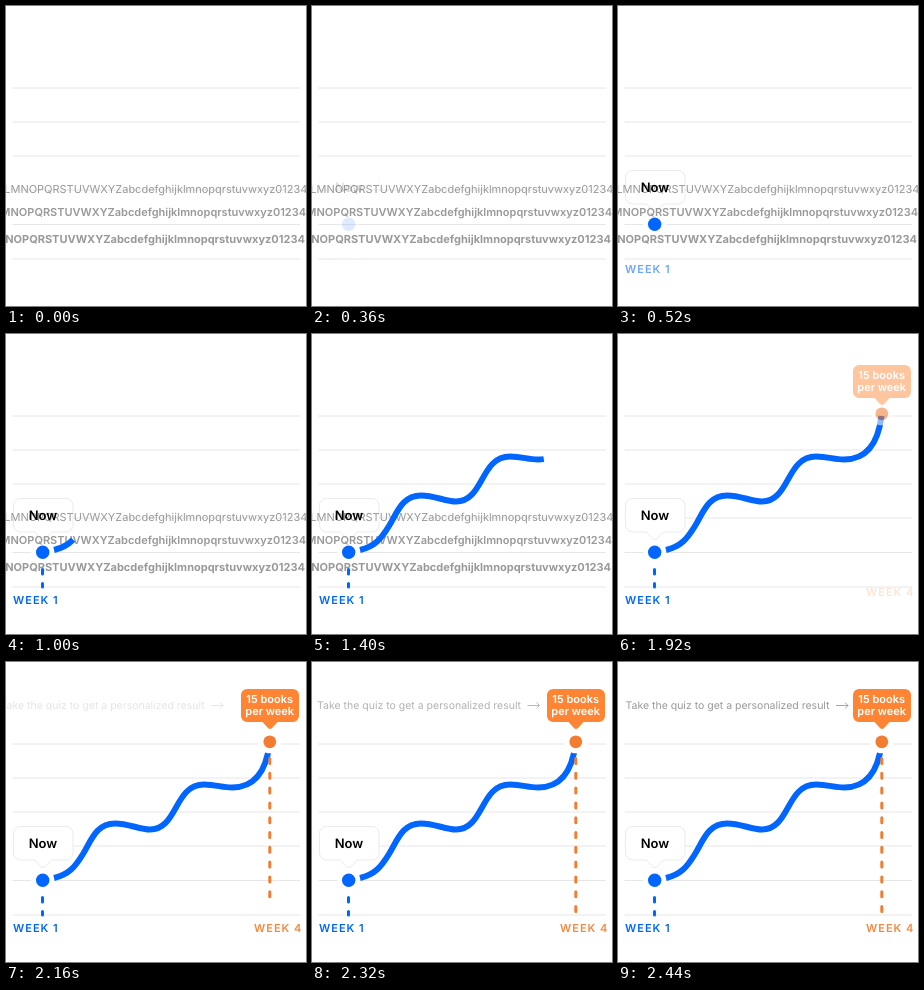
Write an HTML page that moves like this. It is 300x300 px and loops after 2600 ms.

```html
<!DOCTYPE html>
<html lang="en">
<head>
<meta charset="utf-8">
<title>Reading progress</title>
<style>
  html, body { margin: 0; width: 100%; height: 100%; overflow: hidden; background: #fff; }
  svg { display: block; width: 100vw; height: 100vh; }
  text { font-family: Inter, "Open Sans", sans-serif; font-size: 11px; font-weight: 600; text-rendering: geometricPrecision; }
  .week { letter-spacing: 1px; }
  .dash { stroke-width: 3; stroke-linecap: round; }
  #alphabet text { fill: #999; text-anchor: end; }
  #hint text { font-size: 10.5px; font-weight: 400; fill: #999; }
  .mid { text-anchor: middle; }
</style>
</head>
<body>
<svg viewBox="0 0 300 300">
  <path id="grid" stroke="#e6e6e6" fill="none"/>

  <g id="nowBox">
    <path d="M14.5 164.5H60a7 7 0 0 1 7 7V191a7 7 0 0 1-7 7H45.5L39 204.8Q37 206.6 35 204.8L28.5 198H14.5a7 7 0 0 1-7-7V171.5a7 7 0 0 1 7-7Z" fill="#fff" stroke="#ebebeb"/>
    <circle cx="36.7" cy="218.3" r="11.5" fill="#fff"/>
  </g>

  <g id="alphabet">
    <text x="301.3" y="187" style="font-weight:400"></text>
    <text x="300" y="210"></text>
    <text x="299" y="237.3" style="font-weight:700"></text>
  </g>

  <path id="curve" pathLength="1" fill="none" stroke="#06f" stroke-width="6"
    d="M48 216C63 212.5 69 205 77 192C85 179 90 161.5 109 161.5C123 161.5 133 167.5 144 167.5C172 167.5 168 122.5 198 122.5C210 122.5 216 125.5 226 125.5C248 125.5 260 110 263.5 82"/>

  <g id="nowMark">
    <text class="mid" x="37" y="185.8" style="font-size:13px">Now</text>
    <circle cx="36.7" cy="218.3" r="6.7" fill="#06f"/>
  </g>
  <line id="blueDash" class="dash" x1="36.5" x2="36.5" y1="235.5" stroke="#06f" stroke-dasharray="4.5 9.5"/>
  <text id="week1" class="week" x="7" y="270.1" fill="#06f">WEEK 1</text>

  <g id="goalDot">
    <circle cx="263.8" cy="79.8" r="11.5" fill="#fff"/>
    <circle cx="263.8" cy="79.8" r="6.4" fill="#f27d31"/>
  </g>
  <g id="goalBubble">
    <path d="M241 27H287a6 6 0 0 1 6 6V54a6 6 0 0 1-6 6H271.5L265.8 66.2Q264 67.8 262.2 66.2L256.5 60H241a6 6 0 0 1-6-6V33a6 6 0 0 1 6-6Z" fill="#ff8534"/>
    <g class="mid" fill="#fff">
      <text x="263.7" y="41">15 books</text>
      <text x="263.7" y="53">per week</text>
    </g>
  </g>
  <line id="orangeDash" class="dash" x1="263.8" x2="263.8" y1="96.5" stroke="#f27d31" stroke-dasharray="5 9.8"/>
  <text id="week4" class="week" x="248" y="270.1" fill="#f9873d">WEEK 4</text>

  <g id="hint">
    <text x="7.5" y="47">Take the quiz to get a personalized result</text>
    <path d="M218 43.5H230M227 40.5L230 43.5L227 46.5" fill="none" stroke="#999" stroke-width=".9"/>
  </g>
</svg>
<script>
const LOOP = 2600;
const $ = id => document.getElementById(id);

$('grid').setAttribute('d', [82, 116, 150, 184, 218.5, 253].map(y => `M6.5 ${y}H294`).join(''));
for (const row of $('alphabet').children)
  row.textContent = 'ABCDEFGHIJKLMNOPQRSTUVWXYZabcdefghijklmnopqrstuvwxyz01234';

const progress = (t, start, end) => Math.min(1, Math.max(0, (t - start) / (end - start)));

// cubic-bezier(.25, .1, .25, 1), solved by bisection
function ease(x) {
  if (x <= 0 || x >= 1) return x;
  const bezier = (s, a, b) => 3 * s * (1 - s) ** 2 * a + 3 * s * s * (1 - s) * b + s ** 3;
  let low = 0, high = 1;
  for (let i = 0; i < 20; i++) {
    const s = (low + high) / 2;
    if (bezier(s, .25, .25) < x) low = s; else high = s;
  }
  return bezier(low, .1, 1);
}

// id, start, end, starting offset x, y
const fades = [
  ['nowBox', 340, 500, 0, 0],
  ['nowMark', 340, 500, 0, 0],
  ['week1', 360, 640, 0, -11],
  ['goalDot', 1770, 2040, 0, 0],
  ['goalBubble', 1790, 2070, 0, 10.5],
  ['week4', 1860, 2150, 0, -11],
  ['hint', 2080, 2400, -20, 0],
];

// id, start, end, top, bottom
const dashes = [
  ['blueDash', 560, 680, 235.5, 253],
  ['orangeDash', 1960, 2180, 96.5, 252],
];

function render(t) {
  for (const [id, start, end, dx, dy] of fades) {
    const p = progress(t, start, end), el = $(id);
    const away = (1 - p) ** 1.5;
    el.setAttribute('opacity', p);
    el.setAttribute('transform', `translate(${dx * away} ${dy * away})`);
  }
  for (const [id, start, end, top, bottom] of dashes) {
    const p = progress(t, start, end), el = $(id);
    el.setAttribute('opacity', p > 0 ? 1 : 0);
    el.setAttribute('y2', top + (bottom - top) * p);
  }
  const drawn = ease(progress(t, 915, 1895));
  $('curve').setAttribute('stroke-dasharray', `${drawn} 2`);
  $('curve').setAttribute('opacity', t < 995 ? 0 : 1);
  $('alphabet').setAttribute('opacity', t < 1720 ? 1 : 0);
}

function tick() {
  render(performance.now() % LOOP);
  requestAnimationFrame(tick);
}
render(0);
requestAnimationFrame(tick);
</script>
</body>
</html>
```
